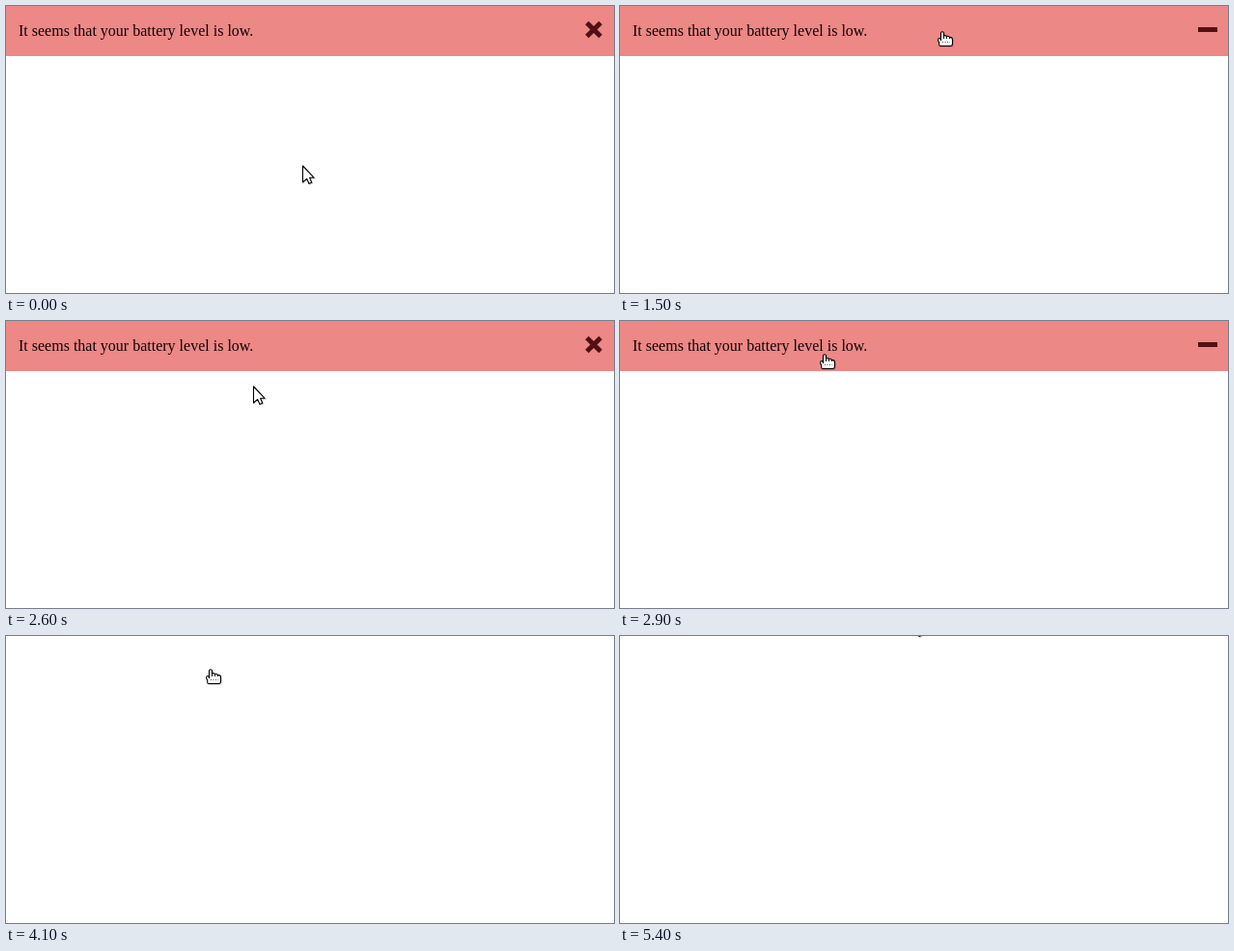
An HTML page that plays this animation: 630 px wide and 298 px high, repeating every 5800 ms.

```html
<!DOCTYPE html>
<html lang="en">
<head>
<meta charset="utf-8">
<title>Battery notice</title>
<style>
  html, body { margin: 0; width: 100%; height: 100%; overflow: hidden; background: #fff; }
  svg { display: block; }
  text { font: 16px "Liberation Serif", serif; fill: #100204; }
  .outline { fill: #fff; stroke: #000; stroke-width: 1.1; stroke-linejoin: round; }
  .shadow { fill: none; stroke: #000; stroke-width: 1.4; opacity: .14; }
</style>
</head>
<body>
<svg width="630" height="298" viewBox="0 0 630 298">
  <defs>
    <path id="arrowShape" d="M.5 1V18L4.6 14.3L7 19.5L9.8 18.3L7.6 13.3H12.2Z"/>
    <path id="handShape" d="M3.5 9.5V2.2Q3.5 .7 5 .7T6.5 2.2V5Q8 4.2 9.5 5.4Q11 4.8 12.5 6.4Q15.5 6.6 15.5 8.8V13Q15.5 15.5 13.5 15.5H3Q1.7 15.5 1.7 14V11.5Q.6 10.5 .6 8.9Q.6 7.5 2 7.5Q3.5 7.6 3.5 9.5Z"/>
  </defs>
  <g id="notice">
    <rect width="630" height="52" fill="#ec8886"/>
    <text x="13" y="31">It seems that your battery level is low.</text>
    <g fill="#521014">
      <rect id="barA" x="599" y="22" width="20" height="5"/>
      <rect id="barB" x="599" y="22" width="20" height="5"/>
    </g>
  </g>
  <g id="pointer">
    <g id="arrow">
      <use href="#arrowShape" class="shadow" x=".8" y=".8"/>
      <use href="#arrowShape" class="outline"/>
    </g>
    <g id="hand" transform="translate(-3 0)">
      <use href="#handShape" class="shadow" x=".7" y=".7"/>
      <use href="#handShape" class="outline"/>
      <path d="M6.5 5V8M9.5 5.4V8M12.5 6.4V8" stroke="#000" stroke-width=".9"/>
      <path d="M5 11.5H13" stroke="#555" stroke-dasharray="1 1.5"/>
    </g>
  </g>
</svg>
<script>
const LOOP = 5800, STEP = 100;
const ENTER_1 = 1270, LEAVE = 2160, ENTER_2 = 2670, CLICK = 3965, RELEASE = 4500;
const FADE = 200, SLIDE = 135;

// where the pointer rests
const START = [307, 165], FIRST = [331.5, 26], SECOND = [210, 34], GONE = [303, -19];

const el = id => document.getElementById(id);
const [notice, barA, barB, pointer, arrow, hand] =
  ["notice", "barA", "barB", "pointer", "arrow", "hand"].map(el);

const span = (t, from, to) => Math.min(1, Math.max(0, (t - from) / (to - from)));
const easeOut = u => 1 - (1 - u) ** 2;

const cubic = (a, b, c, d, s) =>
  a * (1 - s) ** 3 + 3 * b * s * (1 - s) ** 2 + 3 * c * s * s * (1 - s) + d * s ** 3;
const line = (p, q, s) => p.map((v, i) => v + (q[i] - v) * s);
const curve = (p, a, b, q, s) => p.map((v, i) => cubic(v, a[i], b[i], q[i], s));

// CSS "ease": find the parameter for u by bisection
function ease(u) {
  let lo = 0, hi = 1;
  for (let i = 0; i < 24; i++) {
    const mid = (lo + hi) / 2;
    if (cubic(0, .25, .25, 1, mid) < u) lo = mid; else hi = mid;
  }
  return cubic(0, .1, 1, 1, lo);
}

const run = (t, start, length) => ease(span(t, start, start + length));

function pointerAt(t) {
  if (t < 2000) return line(START, FIRST, t < 800 ? 0 : easeOut(span(t, 690, 1500)));
  if (t < 4000) return curve(FIRST, [349.5, 214], [226, 11], SECOND, span(t, 2050, 2900));
  return line(SECOND, GONE, span(t, 4850, 5400));
}

function draw(t) {
  const hover = run(t, ENTER_1, FADE) - run(t, LEAVE, FADE) + run(t, ENTER_2, FADE);
  const angle = 45 * (1 - hover);
  barA.setAttribute("transform", `rotate(${angle} 609 24.5)`);
  barB.setAttribute("transform", `rotate(${-angle} 609 24.5)`);

  const lift = Math.round(52 * run(t, CLICK, SLIDE));
  notice.setAttribute("transform", `translate(0 ${-lift})`);
  notice.style.display = lift < 52 ? "" : "none";

  const [x, y] = pointerAt(t).map(Math.round);
  const pointing = (t >= ENTER_1 && t < LEAVE) || (t >= ENTER_2 && t < RELEASE);
  pointer.setAttribute("transform", `translate(${x} ${y})`);
  arrow.style.display = pointing ? "none" : "";
  hand.style.display = pointing ? "" : "none";
}

// the screen refreshes ten times a second
const begin = performance.now();
function tick() {
  const t = (performance.now() - begin) % LOOP;
  draw(Math.floor(t / STEP) * STEP);
  requestAnimationFrame(tick);
}
tick();
</script>
</body>
</html>
```
